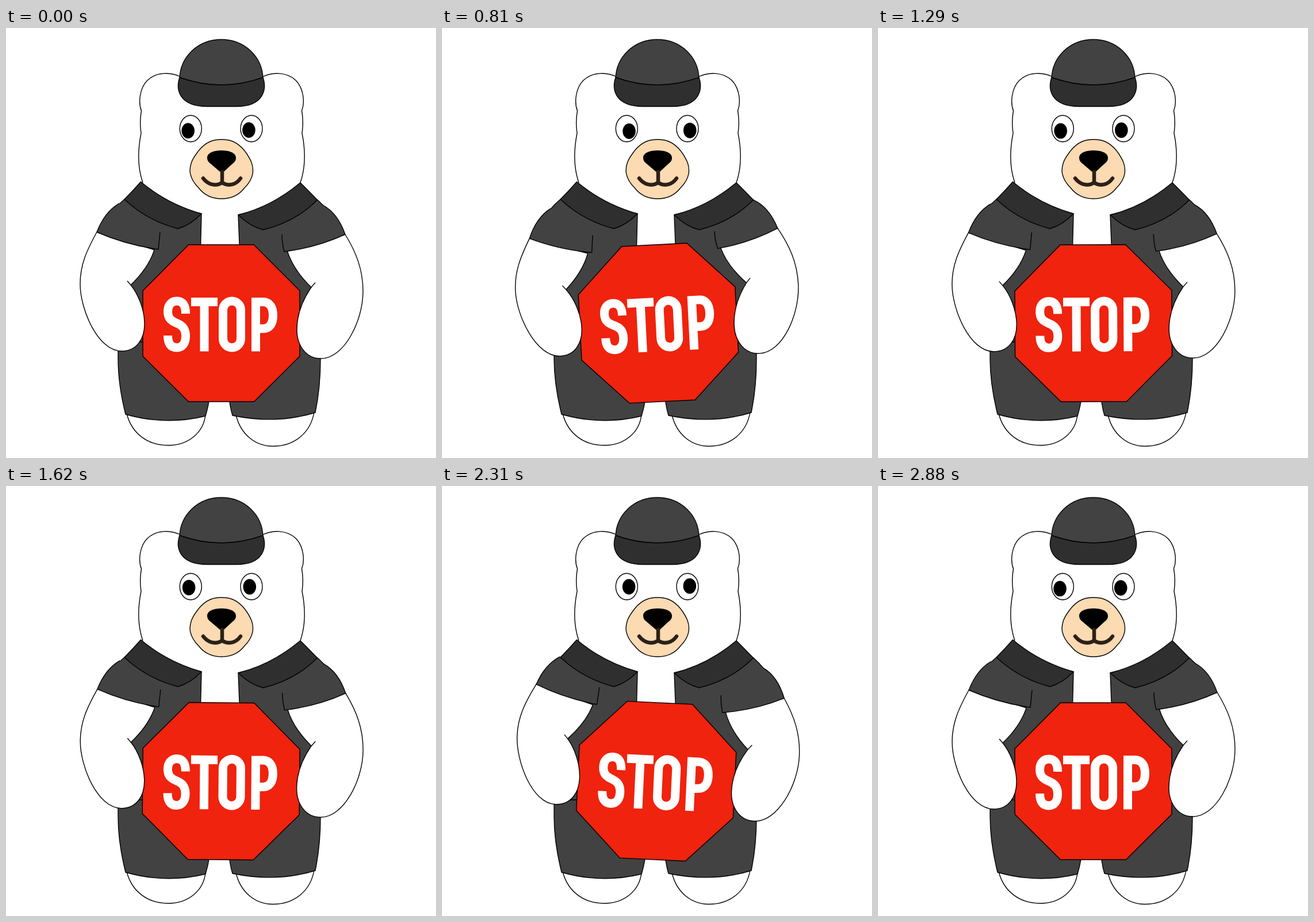
An HTML page for the animation above (2910 ms loop, 748 by 748 pixels).

```html
<!DOCTYPE html>
<html lang="en">
<head>
<meta charset="utf-8">
<title>Bear with a stop sign</title>
<style>
  html, body { margin: 0; width: 100%; height: 100%; overflow: hidden; background: #fff; }
  svg { display: block; width: 100vw; height: 100vh; }
  .line { fill: none; }
  .coat { fill: #424242; }
  .trim { fill: #2f2f2f; }
  .skin { fill: #fff; }
  .flat { stroke: none; }
</style>
</head>
<body>
<svg viewBox="0 0 748 748" stroke="#000" stroke-width="1.4" stroke-linejoin="round">
  <!-- feet -->
  <path class="skin" d="M210 671C219 706 247 726 282 726C317 726 344 704 347 672Z"/>
  <path class="skin" d="M400 673C408 707 434 727.500 464 727.500C502 727.500 530 704 536 668Z"/>

  <!-- coat and trousers -->
  <path class="coat" d="M206 298Q196 306 188 316L195 450V575C195 610 200 640 208 672Q278 692 347 675Q353 655 354 640L338 400L340 323Z"/>
  <path class="coat" d="M542 299Q552 308 560 318L547 450V575C547 615 544 640 538 669Q470 690 394 674Q389 657 388 640L407 400L404 325Z"/>
  <path class="line" d="M215 546H300"/>

  <!-- sign and arms sway together -->
  <g id="sway">
    <path fill="#ef230e" d="M317.500 377H431L511 457V571L431.500 650H317.500L238 571V457Z"/>
    <g class="line" role="img" aria-label="STOP" stroke="#fff" stroke-width="15" stroke-linejoin="miter">
      <path d="M312.500 497C312.500 483 308 475 297 475C287 475 281.500 483 281.500 493C281.500 504 286 509 297 513.500C308 518 312.500 524 312.500 536C312.500 548 307 556 297 556C286 556 281.500 548 281.500 535"/>
      <path d="M322 476.500H368M345 476.500V562.500"/>
      <rect x="377.500" y="475" width="31" height="81" rx="15.500"/>
      <path d="M434.500 562.500V476.500H447C459 476.500 464.500 486 464.500 500S459 523 447 523H434.500"/>
    </g>

    <path class="skin" d="M158 355C140 388 129 412 129 445C129 490 160 562 201 562C228 562 241 540 241 515C241 490 230 463 217 447Q248 417 258 386Z"/>
    <path class="line" d="M211 440L217 447"/>
    <path class="coat flat" d="M197 305C178 316 166 334 158 355Q208 377 265 385L268 355Z"/>
    <path class="line" d="M197 305C178 316 166 334 158 355Q208 377 265 385L268 355"/>

    <path class="skin" d="M590 359C609 390 621 420 621 458C621 510 588 575 548 575C520 575 506 550 506 525C506 495 518 470 531 451Q499 420 489 387Z"/>
    <path class="line" d="M538 443L531 451"/>
    <path class="coat flat" d="M551 308C570 318 582 336 590 359Q540 382 484 389Q480 374 480 359Z"/>
    <path class="line" d="M551 308C570 318 582 336 590 359Q540 382 484 389Q480 374 480 359"/>
  </g>

  <!-- collar -->
  <path class="trim" d="M234.500 267.500Q280 306 340 323Q321 343 299 349Q245 335 206 298Q220 284 234.500 267.500Z"/>
  <path class="trim" d="M512 269Q462 311 404 325Q424 345 447 351Q503 338 541.500 299Q527 284 512 269Z"/>

  <!-- head -->
  <path class="line" d="M238 269C228 240 230 208 235 183Q232 163 235.500 144C230 130 232 105 246 91C262 76 287 76 306 86M512 269C522 240 520 208 515 183Q518 163 514.500 144C520 130 518 105 504 91C488 76 463 76 444 86"/>
  <path class="coat" d="M302 88C303 50 334 20 374.500 20S446 50 447 88Q374 112 302 86Z"/>
  <path class="trim" d="M302 86Q374 112 447 86C454 107 448 136.500 401 136.500H350C301 136.500 295 107 302 86Z"/>

  <!-- eyes -->
  <ellipse class="skin" cx="321.300" cy="175" rx="19" ry="23"/>
  <ellipse class="skin" cx="427" cy="175" rx="19" ry="23"/>
  <g id="pupils" class="flat" fill="#000">
    <ellipse cx="321.300" cy="178.800" rx="11.300" ry="13.500"/>
    <ellipse cx="427" cy="177.500" rx="11.300" ry="13.500"/>
  </g>

  <!-- muzzle -->
  <path fill="#fcdab2" d="M375 194C398 193 411 207 419 219C426 230 430 238 429.500 249C429 262 422 271 415 278C405 291 392 297 375 297S345 291 335 278C328 271 321 262 320 249C320 238 323 230 331 219C339 207 352 193 375 194Z"/>
  <path class="flat" fill="#000" d="M375 213C389 213 400 217 400 226C400 231 397 234 393 237L380 249Q376 253 371 249L357 237C353 234 350 231 350 226C350 217 361 213 375 213Z"/>
  <path class="line" stroke="#2b2118" stroke-width="6.500" stroke-linecap="round" d="M376 250V269M343 261.500C352 273 365 276 376 269C387 276 400 273 408 261.500"/>
</svg>
<script>
  const STEP = 30, LOOP = 2910, SWING = 720, TILT = 3;
  const sway = document.getElementById('sway');
  const pupils = document.getElementById('pupils');

  // Each swing of the eyes: start x, end x, start y, end y, height of the arc.
  const swings = [
    [-4.6, 4.6, 0, 0.6, 1.2],
    [4.6, -4.6, 0.6, 0, 0.6],
    [-4.6, 4.8, 0, -1, -4],
    [4.8, -4.8, -1, -0.2, -7]
  ];
  const mix = (a, b, s) => a + (b - a) * s;

  function draw(now) {
    const t = Math.floor(now % LOOP / STEP) * STEP;
    const i = Math.min(3, Math.floor(t / SWING));
    const s = (1 - Math.cos(Math.PI * (t / SWING - i))) / 2;
    const angle = (i % 2 ? 1 - s : s) * (i < 2 ? -TILT : TILT);
    const [x0, x1, y0, y1, arc] = swings[i];
    const x = mix(x0, x1, s), y = mix(y0, y1, s) + 4 * s * (1 - s) * arc;
    sway.setAttribute('transform', `rotate(${angle} 375 476)`);
    pupils.setAttribute('transform', `translate(${x} ${y})`);
  }

  function tick() {
    draw(performance.now());
    requestAnimationFrame(tick);
  }
  tick();
</script>
</body>
</html>
```
